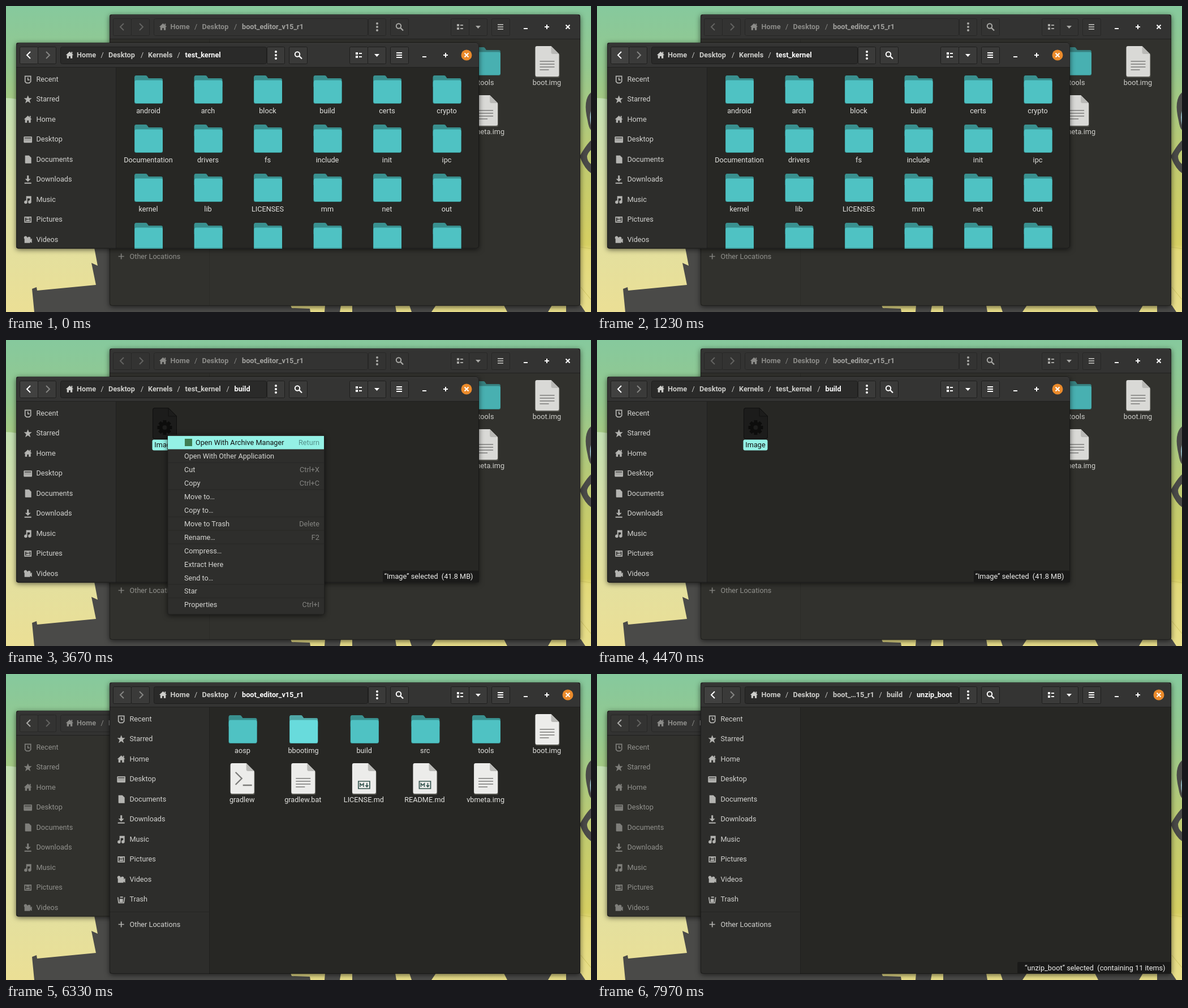
An HTML page that plays this animation: 1034 px wide and 542 px high, repeating every 8 s.

```html
<!DOCTYPE html>
<html lang="en">
<head>
<meta charset="utf-8">
<title>File manager</title>
<style>
  html, body { margin: 0; width: 100%; height: 100%; overflow: hidden; background: #8cc898; }
  svg { display: block; width: 100vw; height: 100vh; }
  text { font: 12.7px Roboto, "Noto Sans", sans-serif; white-space: pre; }
  .b { font-weight: 700; }
  .shadow { filter: drop-shadow(0 2px 5px rgba(0, 0, 0, .6)); }
</style>
</head>
<body>
<svg viewBox="0 0 1034 542" preserveAspectRatio="none">
  <defs>
    <linearGradient id="sky" x2="0" y2="1">
      <stop offset="0" stop-color="#86c99d"/><stop offset=".2" stop-color="#95c88e"/>
      <stop offset=".5" stop-color="#bfca70"/><stop offset=".78" stop-color="#d6cf62"/>
      <stop offset=".8" stop-color="#e2d979"/><stop offset="1" stop-color="#e8de8a"/>
    </linearGradient>
    <linearGradient id="pale" x2="0" y2="1">
      <stop offset="0" stop-color="#c2dfb2"/><stop offset=".45" stop-color="#dde0a6"/>
      <stop offset="1" stop-color="#ebdf95"/>
    </linearGradient>
    <clipPath id="viewA"><path d="M195 109H836V430H195z"/></clipPath>
  </defs>
  <rect width="1034" height="542" fill="url(#sky)"/>
  <path d="M0 163Q40 163 40 190V420H500V542H0z" fill="url(#pale)"/>
  <g fill="#4a4a48">
    <path d="M50 542L46 501 54 498 55 504 159 494 151 455 162 460 156 428H200V530H503L505 535 537 536 538 542z"/>
    <path d="M563 542L564 530H592L590 542zM612 530H688L690 542H612zM713 530H760L752 542H717zM880 530H965L958 542H886zM990 530H1016L1024 542H990z"/>
    <path d="M1034 153Q1019 166 1028 203Q1030 216 1034 220z"/>
    <path d="M1034 238Q1026 245 1014 266Q1022 288 1034 296V280Q1027 275 1027 266Q1029 259 1034 255z"/>
  </g>
  <path d="M1034 186Q1030 196 1034 211z" fill="#8fb3bb"/>
  <path d="M1015 427L1034 430M1016 498L1034 520" stroke="#cbc160" fill="none"/>
</svg>
<script>
const svg = document.querySelector('svg');
const LOOP = 8000, END = 1e9, RAISE = 5230;
const CYAN = '#94f1e5';

const text = (x, y, s, fill, anchor = 'start', cls = '') =>
  `<text x="${x}" y="${y + 4.5}" fill="${fill}" text-anchor="${anchor}" class="${cls}">${s}</text>`;
const rect = (x, y, w, h, fill, r = 0, more = '') =>
  `<rect x="${x}" y="${y}" width="${w}" height="${h}" rx="${r}" fill="${fill}" ${more}/>`;
const line = (d, col, w = 1, more = '') =>
  `<path d="${d}" fill="none" stroke="${col}" stroke-width="${w}" ${more}/>`;
const at = (x, y, s) => `<g transform="translate(${x} ${y})">${s}</g>`;
// Shown from a to b, with an optional fade at both ends
const show = (a, b, s, fade = 0) => `<g data-show="${a},${b},${fade}">${s}</g>`;

const ON = {
  head: '#343433', side: '#2d2d2b', view: '#272724', text: '#d3d3d0', icon: '#b4b4b1',
  crumb: '#cdcdca', cur: '#fff', glyph: '#fff', off: '#858583', btn: '#3a3a39', edge: '#1e1e1d',
  bar: '#2a2a29', label: '#e2e2df', folder: '#4fc2c3', tab: '#39908f', page: '#ececea'
};
const DIM = {
  head: '#333332', side: '#31312d', view: '#31312d', text: '#91918d', icon: '#7e7e7a',
  crumb: '#8b8b88', cur: '#a3a3a0', glyph: '#a9a9a6', off: '#636361', btn: 'none', edge: '#272726',
  bar: 'none', label: '#d0d0cc', folder: '#48b0b1', tab: '#37807f', page: '#d9d9d6'
};
const HOVER = { folder: '#68dbdc', tab: '#50a8a7', page: '#ffffff', exe: '#2f2f2d' };
const PICKED = { folder: '#30b4b0', tab: '#22807f' };

// Sidebar places: name, filled path, stroked path
const places = [
  ['Recent', '', 'M-5-5.5H5V4L2.5 6.5H-2.5L-5 4zM0-3V1H3'],
  ['Starred', 'M0-7L2-2H7L3 1.500 4.600 7 0 3.700-4.600 7-3 1.500-7-2H-2z', ''],
  ['Home', 'M0-6.500L7 0H5V6H1.500V2H-1.500V6H-5V0H-7zM3-6H5V-2L3-4z', ''],
  ['Desktop', 'M-7-5H7V-3H-7zM-7 2H7V6H-7z', 'M-6.500-4V5M6.500-4V5M-6-1H6M-6 1H6'],
  ['Documents', 'M-5-7H2L6-3V7H-4Q-5 7-5 6z', ''],
  ['Downloads', 'M-1.500-7H1.500V-1H5L0 4-5-1H-1.500zM-6 5.500H6V7.500H-6z', ''],
  ['Music', 'M-3-6H6V4A2.800 2.800 0 1 1 3.500 1.500V-2H-1V5A2.800 2.800 0 1 1-3 2z', ''],
  ['Pictures', 'M-4 3L-1.500-1 0 1 2-1.500 4 3z', 'M-5.500-4.500H5.500V4.500H-5.500zM-3-2.500H3'],
  ['Videos', 'M-6-1A3 3 0 1 1-1-3 3 3 0 1 1 4 0L7-2V6L4 4V6H-6z', ''],
  ['Trash', 'M-3-1H3V5H-3zM-2-5H3V-3H-2z', 'M-6-4L-4.500 6H4.500L6-4'],
  ['Other Locations', '', 'M-5 0H5M0-5V5']
];

const placeIcon = ([, fill, stroke], col) =>
  `<path d="${fill}" fill="${col}"/>` + line(stroke, col, 1.7);

const folder = c => (x, y) => at(x - 25, y,
  `<path d="M0 4Q0 0 3 0H20Q22 0 23 2L25 5H47Q50 5 50 8V20H0z" fill="${c.tab}"/>` +
  rect(0, 10, 50, 40, c.tab, 3) + rect(.5, 8.5, 49.5, 40.5, c.folder, 3));

const marks = {
  text: line('M8 27H34M8 32H34M8 37H34M8 42H24', '#7b7b79', 1.6),
  shell: line('M9 16L20 27 9 38M22 39H38', '#7b7b79', 2.4),
  md: line('M11 32H31V45H11z', '#34544f', 1.7) +
    line('M14 42V36L17 39 20 36V42M26 35V41M23.500 39L26 42 28.500 39', '#34544f', 1.6)
};
const page = (c, mark) => (x, y) => at(x - 21, y - 2,
  `<path d="M3 1H28L43 16V53Q43 56 40 56H3Q0 56 0 53V4Q0 1 3 1z" fill="#55554f"/>
   <path d="M3 0H28L42 14V51Q42 54 39 54H3Q0 54 0 51V3Q0 0 3 0z" fill="${c.page}"/>
   <path d="M28 0L42 14H31Q28 14 28 11z" fill="#b9b9b6"/>` + marks[mark]);

let gear = '';
for (let i = 0; i < 8; i++) gear += `<path d="M-3-13H3V-6H-3z" transform="rotate(${i * 45})"/>`;
const program = fill => (x, y) => at(x - 21.5, y - 3,
  `<path d="M4 .5H28L42.500 15V51Q42.500 55 39 55H4Q.5 55 .5 51V4Q.5 .5 4 .5z" fill="${fill}" stroke="#0f0f0e"/>
   <path d="M28 1V15H42" fill="none" stroke="#111"/>` +
  at(21.5, 35, `<g fill="#0d0d0c">${gear}</g><circle r="7" fill="none" stroke="#0d0d0c" stroke-width="6"/>`));

const label = (x, y, s, col) => text(x - .5, y + 62.5, s, col, 'middle');
const picked = (x, y, s, w, icon) =>
  icon(x, y) + rect(x - .5 - w / 2, y + 53.5, w, 19, CYAN, 3) + label(x, y, s, '#111');

const tree = 'android arch block build certs crypto Documentation drivers fs include init ipc kernel lib LICENSES mm net out'.split(' ');

function kernelView(c) {
  let s = '';
  for (let i = 0; i < 24; i++) {
    const x = 252 + i % 6 * 105.5, y = 123 + Math.floor(i / 6) * 87;
    s += folder(c)(x, y) + (tree[i] ? label(x, y, tree[i], c.label) : '');
  }
  s += show(1600, 1630, folder(HOVER)(568.5, 123)) +
    show(1630, END, picked(568.5, 123, 'build', 38, folder(PICKED)));
  const x = 280.5, y = 123;
  return `<g clip-path="url(#viewA)">${show(0, 1900, s)}</g>` +
    show(1930, END,
      program('#1f1f1e')(x, y) + label(x, y, 'Image', c.label) +
      show(2400, 2700, program(HOVER.exe)(x, y)) +
      show(2700, END, picked(x, y, 'Image', 43, program('#1c1c1b'))));
}

const root = [['aosp'], ['bbootimg'], ['build'], ['src'], ['tools'], ['boot.img', 'text'],
  ['gradlew', 'shell'], ['gradlew.bat', 'text'], ['LICENSE.md', 'md'], ['README.md', 'md'], ['vbmeta.img', 'text']];

function editorView(c) {
  const pos = i => [418.5 + i % 6 * 107.6 - (i > 5 ? .8 : 0), i > 5 ? 160 : 73];
  const s = root.map(([name, mark], i) =>
    (mark ? page(c, mark) : folder(c))(...pos(i)) + label(...pos(i), name, c.label)).join('') +
    show(6230, 6330, page(HOVER, 'text')(...pos(7))) +
    show(6330, 6430, folder(HOVER)(...pos(1))) +
    show(6530, 6730, folder(HOVER)(...pos(2))) +
    show(6730, END, picked(...pos(2), 'build', 38, folder(PICKED)));
  return show(0, 6970, s) + show(7030, 7970,
    folder(c)(447, 73) + label(447, 73, 'unzip_boot', c.label) +
    show(7400, 7670, folder(HOVER)(447, 73)) +
    show(7670, END, picked(447, 73, 'unzip_boot', 73, folder(PICKED))));
}

function header(o, c) {
  const { x, y, w, pathEnd, navFrom } = o, r = x + w, m = y + 22;
  const edge = `stroke="${c.edge}"`;
  const button = (bx, bw) => rect(bx + .5, y + 7.5, bw - 1, 30, c.btn, 2, edge);
  const arrow = (ax, dir, col) => line(`M${ax + 3 * dir} ${m - 6}l${-6 * dir} 6 ${6 * dir} 6`, col, 2);
  const back = x + 22;
  let s = button(x + 6, 33) + button(x + 38, 33) + arrow(x + 56, -1, c.off) +
    show(0, navFrom, arrow(back, 1, c.off)) +
    show(navFrom, END, rect(x + 7, y + 8, 31, 29, c === ON ? '#414140' : '#363634', 2) + arrow(back, 1, c.glyph));
  s += rect(x + 78.5, y + 7.5, pathEnd - x - 79, 30, c.bar, 3, edge) +
    at(x + 94.5, m, `<g transform="scale(.95)">${placeIcon(places[2], c.crumb)}</g>`);
  for (const [name, cx, cur, a, b] of o.crumbs)
    s += show(a, b, text(cx, m - .5, name, name === '/' ? c.crumb : cur ? c.cur : c.crumb, 'start', name === '/' ? '' : 'b'));
  s += button(pathEnd, 32) + button(pathEnd + 39, 33);
  for (const d of [-6, 0, 6]) s += `<circle cx="${pathEnd + 16}" cy="${m + d}" r="2" fill="${c.glyph}"/>`;
  const lx = pathEnd + 54;
  s += `<circle cx="${lx}" cy="${m - 1.5}" r="4.2" fill="none" stroke="${c.glyph}" stroke-width="2"/>` +
    line(`M${lx + 3} ${m + 1.500}l5 5`, c.glyph, 2.3);
  s += button(r - 229, 33) + button(r - 197, 33) + button(r - 157, 33) +
    line(`M${r - 218} ${m - 3}h4M${r - 218} ${m + 3}h4`, c.glyph, 4) +
    line(`M${r - 212} ${m - 3}h5M${r - 212} ${m + 3}h5`, c.glyph, 2) +
    `<path d="M${r - 185} ${m - 2}h9l-4.500 5z" fill="${c.glyph}"/>` +
    line(`M${r - 146} ${m - 4}h10m-10 4h10m-10 4h10`, c.glyph, 2) +
    line(`M${r - 100} ${m + 3}h7M${r - 63} ${m}h8m-4-4v8`, '#fff', 2);
  if (c === ON) s += `<circle cx="${r - 22}" cy="${m}" r="9.5" fill="#ea8a2b"/>`;
  return s + line(`M${r - 25.500} ${m - 3.500}l7 7m0-7l-7 7`, '#fff', 2);
}

function frame(o, c) {
  const { x, y, w, h } = o, mid = x + 176;
  let s = rect(x, y, w, h, c.side, 4) +
    `<path d="M${mid} ${y + 44}H${x + w}V${y + h - 3}q0 3-3 3H${mid}z" fill="${c.view}"/>
     <path d="M${x} ${y + 44}V${y + 4}q0-4 4-4H${x + w - 4}q4 0 4 4V${y + 44}z" fill="${c.head}"/>` +
    line(`M${x + 4} ${y + 1.500}H${x + w - 4}`, 'rgba(255,255,255,.07)') +
    line(`M${x} ${y + 43.500}H${x + w}`, '#20201f') +
    line(`M${mid + .5} ${y + 44}V${y + h}`, c === ON ? '#20201f' : '#2b2b28');
  places.slice(0, o.places).forEach((p, i) => {
    const py = y + 64.3 + i * 35.5 + (i > 9 ? 8.7 : 0);
    s += at(x + 20.7, py + .5, placeIcon(p, c.icon)) + text(x + 35.5, py, p[0], c.text);
  });
  if (o.places > 10) s += line(`M${x} ${y + 406.500}h176`, '#262624');
  return s + header(o, c) + o.view(c) +
    rect(x + .5, y + .5, w - 1, h - 1, 'none', 4, 'stroke="rgba(0,0,0,.35)"');
}

function status(o, from, to, left, name, note) {
  const r = o.x + o.w, b = o.y + o.h;
  return show(from, to, rect(left, b - 21, r - left, 21, '#1a1a19', 2) +
    text(r - 10.5, b - 11, `“${name}” selected\u00a0 (${note})`, '#f0f0ee', 'end'));
}

function menu() {
  const x = 286, y = 168, step = 23.95;
  const rows = [['Open With Archive Manager', 'Return'], ['Open With Other Application'], ['Cut', 'Ctrl+X'],
    ['Copy', 'Ctrl+C'], ['Move to…'], ['Copy to…'], ['Move to Trash', 'Delete'], ['Rename…', 'F2'],
    ['Compress…'], ['Extract Here'], ['Send to…'], ['Star'], ['Properties', 'Ctrl+I']];
  const row = (i, col, keyCol) => {
    const cy = 181.5 + i * step, [name, key = ''] = rows[i];
    return (i ? '' : rect(316, 175, 13, 13, '#3f7d52')) +
      text(i ? 315 : 335, cy, name, col) + text(554, cy, key, keyCol, 'end');
  };
  let s = rect(x, y, 276.5, 318, '#2e2e2c', 3, 'stroke="#20201f" class="shadow"');
  for (const i of [2, 4, 6, 7, 8, 11, 12]) s += line(`M${x} ${169.5 + i * step}h276`, '#272725');
  rows.forEach((_, i) => s += row(i, '#d6d6d3', '#858582'));
  [3670, 3800, 3830, 4100, 4470].forEach((a, i, times) => {
    if (i < 4) s += show(a, times[i + 1], rect(x, 170 + i * step, 276, 23.5, CYAN) + row(i, '#111', '#55918b'));
  });
  return show(3400, 4470, s);
}

const kernel = {
  x: 18, y: 65, w: 818, h: 364.5, pathEnd: 461, navFrom: 0, places: 9, view: kernelView,
  crumbs: [['Home', 125, 0, 0, END], ['/', 167.5, 0, 0, END], ['Desktop', 181, 0, 0, END], ['/', 238, 0, 0, END],
    ['Kernels', 251, 0, 0, END], ['/', 302.5, 0, 0, END], ['test_kernel', 316.5, 1, 0, 1900],
    ['test_kernel', 316.5, 0, 1900, END], ['/', 389.5, 0, 1900, END], ['build', 403.5, 1, 1900, END]]
};
const editor = {
  x: 183, y: 15, w: 832, h: 516, pathEnd: 640, navFrom: 7030, places: 11, view: editorView,
  crumbs: [['Home', 290.5, 0, 0, END], ['/', 333, 0, 0, END], ['Desktop', 346.5, 0, 0, END], ['/', 403, 0, 0, END],
    ['boot_editor_v15_r1', 417, 1, 0, 6970], ['boot_editor_v15_r1', 417, 0, 6970, 7970],
    ['/', 535.5, 0, 6970, 7970], ['build', 549, 1, 6970, 7970], ['boot_…15_r1', 417, 0, 7970, END],
    ['/', 498.5, 0, 7970, END], ['build', 512, 0, 7970, END], ['/', 551.5, 0, 7970, END], ['unzip_boot', 565, 1, 7970, END]]
};

function addWindow(o, from, to, fade, extra) {
  const g = document.createElementNS('http://www.w3.org/2000/svg', 'g');
  g.innerHTML = rect(o.x, o.y, o.w, o.h, DIM.side, 4, 'class="shadow"') +
    frame(o, DIM) + show(from, to, frame(o, ON), fade) + extra;
  svg.append(g);
  return g;
}

const back = addWindow(editor, RAISE, END, 170,
  status(editor, 6930, 7170, 790, 'build', 'containing 1 item') +
  status(editor, 7870, END, 743, 'unzip_boot', 'containing 11 items'));
const front = addWindow(kernel, -1000, 5480, 210,
  status(kernel, 1800, 2030, 612, 'build', 'containing 1 item') +
  status(kernel, 2900, END, 666, 'Image', '41.8 MB') + menu());

const parts = [...svg.querySelectorAll('[data-show]')].map(el => {
  const [a, b, fade] = el.dataset.show.split(',').map(Number);
  return { el, a, b, fade, last: -1 };
});

function draw(t) {
  const top = t < RAISE ? front : back;
  if (svg.lastElementChild !== top) svg.append(top);
  for (const p of parts) {
    let v = t >= p.a && t < p.b ? 1 : 0;
    if (v && p.fade) v = Math.min(1, (t - p.a) / p.fade, (p.b - t) / p.fade);
    if (v === p.last) continue;
    p.last = v;
    p.el.style.display = v ? '' : 'none';
    p.el.style.opacity = v;
  }
}

const start = performance.now();
function tick() {
  draw((performance.now() - start) % LOOP);
  requestAnimationFrame(tick);
}
tick();
</script>
</body>
</html>
```
